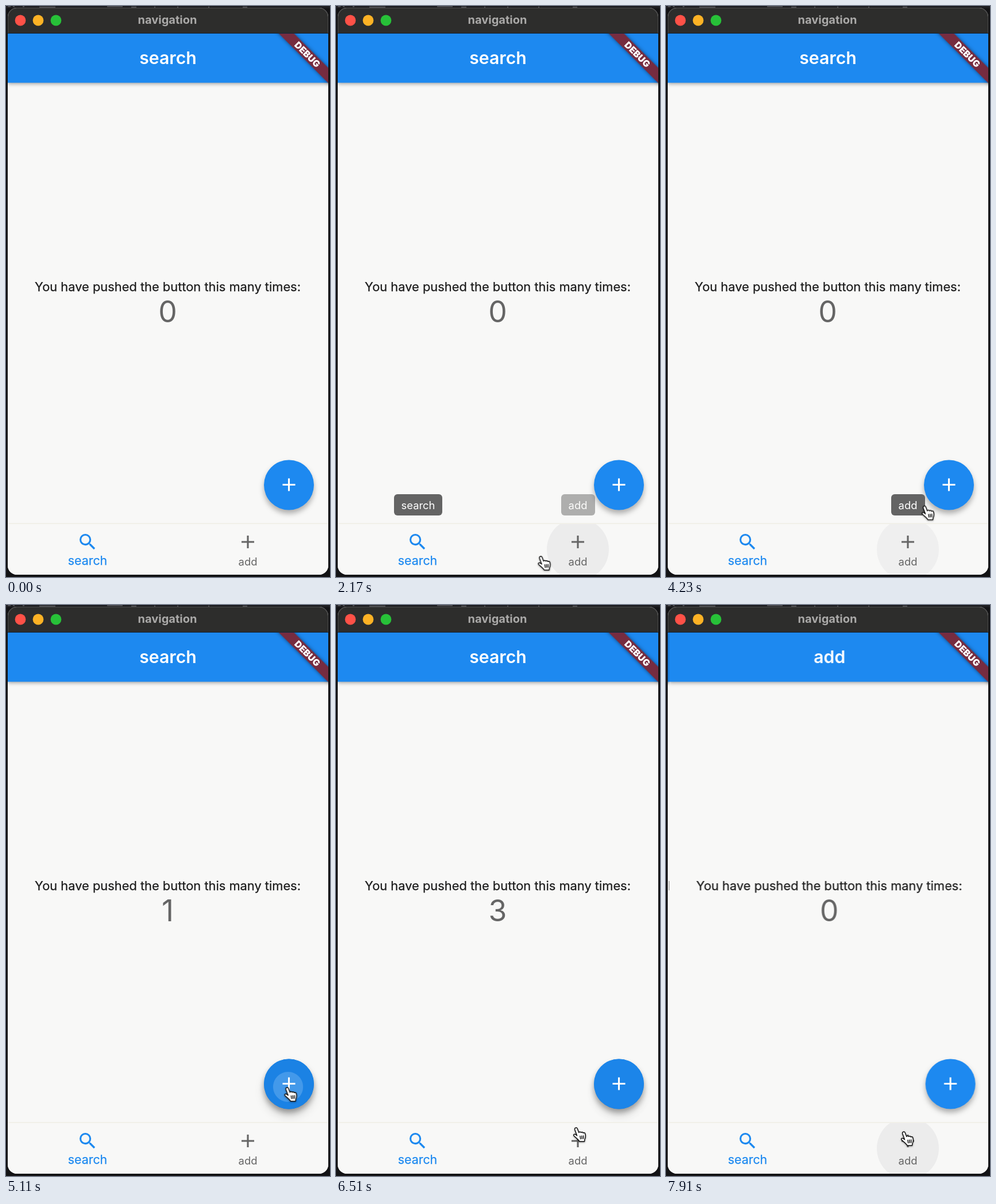
These frames come from a looping animation (564 px wide and 993 px high, 8000 ms). An HTML page:

```html
<!DOCTYPE html>
<html lang="en">
<head>
<meta charset="utf-8">
<title>navigation</title>
<style>
  html, body { margin: 0; width: 100%; height: 100%; overflow: hidden; background: #131315; }
  svg { display: block; width: 564px; height: 993px; }
  text { font-family: Inter, Roboto, sans-serif; text-anchor: middle; }
  .bar { fill: #1d89f0; filter: drop-shadow(0 2px 3px rgba(0, 0, 0, .34)); }
  .title { font-size: 30.2px; font-weight: 600; fill: #fff; }
  .message { font-size: 21.85px; fill: #1b1b1b; stroke: #1b1b1b; stroke-width: .25px; }
  .count { font-size: 51.5px; fill: #656565; }
  .fab { fill: #1d89f0; filter: drop-shadow(0 6px 5px rgba(0, 0, 0, .3)); }
  .lift { filter: drop-shadow(0 12px 8px rgba(0, 0, 0, .16)); }
  .small { font-size: 18.4px; }
  .hidden { opacity: 0; }
  #cursor { filter: drop-shadow(0 1px 1.5px rgba(0, 0, 0, .4)); }
</style>
</head>
<body>
<svg viewBox="0 0 564 993">
  <defs>
    <clipPath id="window"><rect x="3" y="3" width="558" height="986" rx="16"/></clipPath>
    <clipPath id="body"><rect x="3" y="47" width="558" height="854"/></clipPath>
    <clipPath id="tabs"><rect x="3" y="901" width="558" height="88"/></clipPath>
    <clipPath id="button"><circle cx="492.5" cy="833" r="43.5"/></clipPath>
    <linearGradient id="edge">
      <stop offset="0" stop-color="#44440a" stop-opacity="0"/>
      <stop offset="1" stop-color="#44440a" stop-opacity=".018"/>
    </linearGradient>
    <path id="plus" d="M-11 0H11M0-11V11" fill="none" stroke-width="3.1"/>
  </defs>

  <rect width="564" height="993" fill="#131315"/>
  <rect width="564" height="4" fill="#1d1d20"/>
  <path d="M3 1h5m4 0h3m14 0h3M58 2h28M176 1h27M218 2h9M258 2h2m38 0h2M352 2h2m58 0h8" stroke="#4b4b4f" stroke-width="2"/>

  <g clip-path="url(#window)">
    <rect x="3" y="3" width="558" height="986" fill="#f8f8f7"/>
    <g clip-path="url(#body)">
      <g id="first"></g>
      <g id="second" class="hidden"></g>
      <g transform="translate(562 47) rotate(45)">
        <rect x="-70" y="43.5" width="140" height="18.7" fill="#762c40" style="filter:drop-shadow(0 0 3px rgba(0,0,0,.5))"/>
        <text y="58.5" font-size="15.9" font-weight="900" fill="#fff">DEBUG</text>
      </g>
    </g>

    <rect x="3" y="3" width="558" height="44" fill="#2d2d2c"/>
    <path d="M3 47.5H561" stroke="#10263c"/>
    <g id="lights"></g>
    <text x="281" y="31" font-size="20" font-weight="700" fill="#aaa9a8">navigation</text>

    <rect x="3" y="900" width="558" height="89" fill="#f8f8f7"/>
    <path d="M3 900H561" stroke="#efeee4" stroke-width="1.5"/>
    <g clip-path="url(#tabs)">
      <circle id="searchHover" class="hidden" cx="142" cy="945" r="54" fill="#ececec"/>
      <circle id="addHover" class="hidden" cx="421" cy="945" r="54" fill="#ececec"/>
      <circle id="addPress" class="hidden" cx="421" cy="945" r="54" fill="#dddddc"/>
    </g>
    <path transform="translate(123.35 913.3) scale(1.554)" fill="#1d89f0" d="M15.5 14h-.79l-.28-.27A6.47 6.47 0 0 0 16 9.5 6.5 6.5 0 1 0 9.5 16c1.61 0 3.09-.59 4.23-1.57l.27.28v.79l5 4.99L20.49 19l-4.99-5zm-6 0a4.5 4.5 0 1 1 0-9 4.5 4.5 0 0 1 0 9z"/>
    <text x="142" y="972" font-size="21.4" fill="#1d89f0" stroke="#1d89f0" stroke-width=".25">search</text>
    <use href="#plus" x="421" y="932" stroke="#656565"/>
    <text class="small" x="421" y="973" fill="#656565">add</text>

    <g id="searchTip" class="hidden">
      <rect x="101" y="849" width="84" height="37" rx="6" fill="#646464"/>
      <text class="small" x="143" y="875" fill="#fff">search</text>
    </g>
    <g id="addTip" class="hidden">
      <rect x="392" y="849" width="59" height="37" rx="6" fill="#646464"/>
      <text class="small" x="421" y="875" fill="#fff">add</text>
    </g>
  </g>
  <path d="M3.5 47V19.5a16 16 0 0 1 16-16H544.5a16 16 0 0 1 16 16V47" fill="none" stroke="#777" stroke-opacity=".45"/>

  <g id="cursor">
    <g transform="translate(-11.5 -13)" stroke="#111" stroke-width="1.5" stroke-linejoin="round" stroke-linecap="round">
      <path fill="#fff" d="M3.2 4.4C2.4 1.2 6.4-.2 7.7 2.8L10.3 9.4C11 7.8 13.3 7.9 14 9.4 15 8.2 17.1 8.6 17.7 10.1 18.9 9.2 20.7 9.8 21.2 11.5 22.4 15.6 22 18.6 20.4 21.5L20 25H11.4C10 21.8 5.2 18.8 1.7 15.2 .1 12.6 2.7 11.4 4.7 12.9L7 14.7Z"/>
      <path fill="none" d="M12.4 15.5l.8 5M15.2 15.2l.6 5M18.1 15l.2 5"/>
    </g>
  </g>
</svg>

<script>
const LOOP = 8000;
const $ = id => document.getElementById(id);

const page = (title, counts, extras = '') => `
  <rect x="-25" y="47" width="28" height="854" fill="url(#edge)"/>
  <rect x="3" y="47" width="558" height="854" fill="#f8f8f7"/>
  <rect class="bar" x="3" y="47" width="558" height="86.5"/>
  <text class="title" x="282" y="101">${title}</text>
  <text class="message" x="281.5" y="496">You have pushed the button this many times:</text>
  ${counts.map(n => `<text class="count" id="${title}${n}" x="281.5" y="550.3">${n}</text>`).join('')}
  <g id="${title}Fab">
    ${extras && '<circle id="lift" class="fab lift hidden" cx="492.5" cy="833" r="43.5"/>'}
    <circle class="fab" cx="492.5" cy="833" r="43.5"/>
    ${extras}
    <use href="#plus" x="492.5" y="832.5" stroke="#fff"/>
  </g>`;

const clicks = [5000, 5400, 5800];
const ripples = clicks.map((_, i) => `<circle id="ripple${i}" class="hidden" r="10" fill="#fff"/>`).join('');

$('first').innerHTML = page('search', [0, 1, 2, 3], `
  <g clip-path="url(#button)">
    <circle id="fabHover" class="hidden" cx="492.5" cy="833" r="43.5" fill="#000"/>${ripples}
  </g>`);
$('second').innerHTML = page('add', [0]);
$('lights').innerHTML = ['#ff5147', '#fdb225', '#27c138']
  .map((fill, i) => `<circle cx="${25 + 31 * i}" cy="25" r="9.4" fill="${fill}"/>`).join('');

// Each step is [time, value, easing towards the next step].
const start = document.timeline.currentTime || 0;
function play(id, prop, steps) {
  const all = [[0, steps[0][1]], ...steps, [LOOP, steps[steps.length - 1][1]]];
  const frames = all.map(([time, value, easing = 'linear']) =>
    ({ offset: time / LOOP, [prop]: value, easing }));
  $(id).animate(frames, { duration: LOOP, iterations: Infinity }).startTime = start;
}
const fade = (id, ...steps) => play(id, 'opacity', steps);
const shown = (id, from, to) =>
  fade(id, [0, from > 0 ? 0 : 1], [from, 0], [from, 1], [to, 1], [to, 0]);
const move = (x, y) => `translate(${x}px, ${y}px)`;

// Page push with a one-third parallax on the page below.
const PUSH = 7176;
const slide = (id, from, to) => play(id, 'transform', [
  [PUSH, move(from, 0), 'cubic-bezier(.35, .91, .33, .97)'], [PUSH + 810, move(to, 0)]]);
slide('first', 0, -186);
slide('second', 558, 0);
shown('second', PUSH, LOOP);
shown('searchFab', 0, PUSH);

const changes = [0, ...clicks.map(t => t + 60), LOOP];
for (let n = 0; n < 4; n++) shown('search' + n, changes[n], changes[n + 1]);

clicks.forEach((t, i) => {
  const id = 'ripple' + i;
  fade(id, [t, 0], [t + 50, .18], [t + 230, .18], [t + 440, 0]);
  play(id, 'transform', [
    [t, move(494, 843) + ' scale(1.4)'],
    [t + 110, move(491, 838) + ' scale(2.6)'],
    [t + 360, move(492, 833) + ' scale(4.5)']]);
});

fade('fabHover', [4450, 0], [4600, .05], [6400, .05], [6650, 0]);
fade('lift', [4450, 0], [4650, 1], [6450, 1], [6750, 0]);
fade('searchHover', [1500, 0], [1600, 1], [2050, 1], [2150, 0]);
fade('addHover', [2060, 0], [2150, 1], [4190, 1], [4340, 0], [6530, 0], [6640, 1]);
fade('addPress', [7040, 0], [7150, 1], [7420, 1], [7750, 0]);
fade('searchTip', [1540, 0], [1800, 1], [2230, 1], [2450, 0]);
fade('addTip', [2070, 0], [2270, 1], [4330, 1], [4530, 0], [6600, 0], [6800, 1], [7040, 1], [7150, 0]);

play('cursor', 'transform', [
  [1250, 145, 1015], [1550, 148, 966], [1930, 160, 965], [2170, 362.5, 969],
  [2500, 412, 958], [3700, 416, 950], [4230, 456, 881.5], [4600, 490, 858],
  [4900, 495.5, 851], [6100, 495.5, 851], [6510, 424, 921], [6700, 420, 928]
].map(([time, x, y]) => [time, move(x, y), 'ease-in-out']));
</script>
</body>
</html>
```
